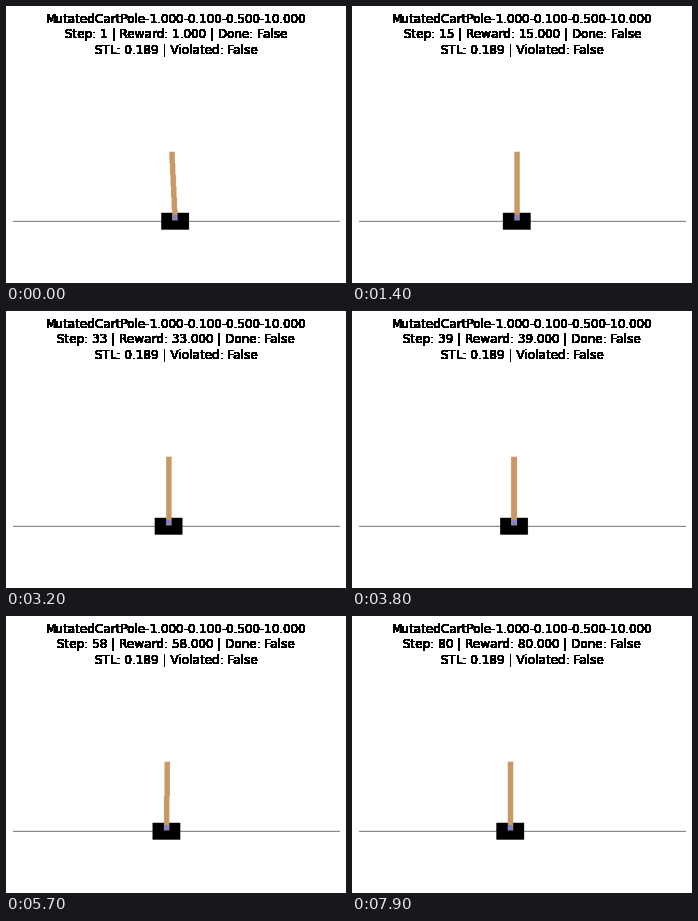
Write a matplotlib script that moves like this. It is 340 by 277 pixels and loops after 8 s.

```python
import numpy as np
import matplotlib.pyplot as plt
from matplotlib.animation import FuncAnimation

W, H, DPI = 340, 277, 72
FRAMES, INTERVAL = 80, 100
PAD, VIEW_W, VIEW_H = 7.2, 326.16, 217.44   # scene box in pixels
TITLE_GAP = 5.3
SCENE_W, SCENE_H = 600, 400

TRACK_Y, AXLE_Y = 100, 107.5
CART_W, CART_H = 50, 30
POLE_W, POLE_LEN = 10, 125
BLACK = (0, 0, 0)
POLE = (202, 152, 101)
AXLE = (129, 132, 203)

# scene pixel grid, y pointing up
gx = np.arange(SCENE_W)[None, :]
gy = np.arange(SCENE_H)[::-1, None]


def pose(i):
    """Cart centre and pole angle: quick recovery, then a slow drift and sway."""
    settle = np.exp(-i / 4)
    cart_x = 291.6 - 0.18 * i + 5.7 * settle
    t = i - 14
    sway = np.cos(np.radians(4.3 * t + 0.095 * t ** 2))
    angle = 0.0055 + 0.009 * sway - 0.059 * settle
    return cart_x, angle


def box(left, right, bottom, top, x, y, angle=0.0):
    """Mask of a rectangle turned clockwise about (x, y), corners on whole pixels."""
    c, s = np.cos(angle), np.sin(angle)
    corners = [(left, bottom), (right, bottom), (right, top), (left, top)]
    pts = [(int(x + u * c + v * s), int(y - u * s + v * c)) for u, v in corners]
    mask = np.ones((SCENE_H, SCENE_W), bool)
    for (x0, y0), (x1, y1) in zip(pts, pts[1:] + pts[:1]):
        mask &= (x1 - x0) * (gy - y0) - (y1 - y0) * (gx - x0) >= 0
    return mask


def scene(i):
    x, angle = pose(i)
    img = np.full((SCENE_H, SCENE_W, 3), 255, np.uint8)
    img[box(-CART_W / 2, CART_W / 2, -CART_H / 2, CART_H / 2, x, TRACK_Y)] = BLACK
    half = POLE_W / 2
    img[box(-half, half, -half, POLE_LEN - half, x, AXLE_Y, angle)] = POLE
    img[(gx - int(x)) ** 2 + (gy - int(AXLE_Y)) ** 2 <= half ** 2] = AXLE
    img[SCENE_H - 1 - TRACK_Y] = BLACK
    return img


def caption(i):
    n = i + 1
    return ("MutatedCartPole-1.000-0.100-0.500-10.000\n"
            f"Step: {n} | Reward: {n:.3f} | Done: False\n"
            "STL: 0.189 | Violated: False")


plt.rcParams["font.family"] = "DejaVu Sans"
fig = plt.figure(figsize=(W / DPI, H / DPI), dpi=DPI, facecolor="white")
ax = fig.add_axes([PAD / W, PAD / H, VIEW_W / W, VIEW_H / H])
ax.axis("off")
view = ax.imshow(scene(0), interpolation="antialiased", aspect="auto")

# stacked copies harden the soft glyph edges into solid black
titles = [
    fig.text((PAD + VIEW_W / 2) / W, (PAD + VIEW_H + TITLE_GAP) / H, caption(0),
             fontsize=12, color="black", ha="center", va="baseline")
    for _ in range(45)
]


def update(i):
    view.set_data(scene(i))
    for title in titles:
        title.set_text(caption(i))
    return [view, *titles]


anim = FuncAnimation(fig, update, frames=FRAMES, interval=INTERVAL,
                     repeat=True, repeat_delay=0, blit=False)
plt.show()
```
